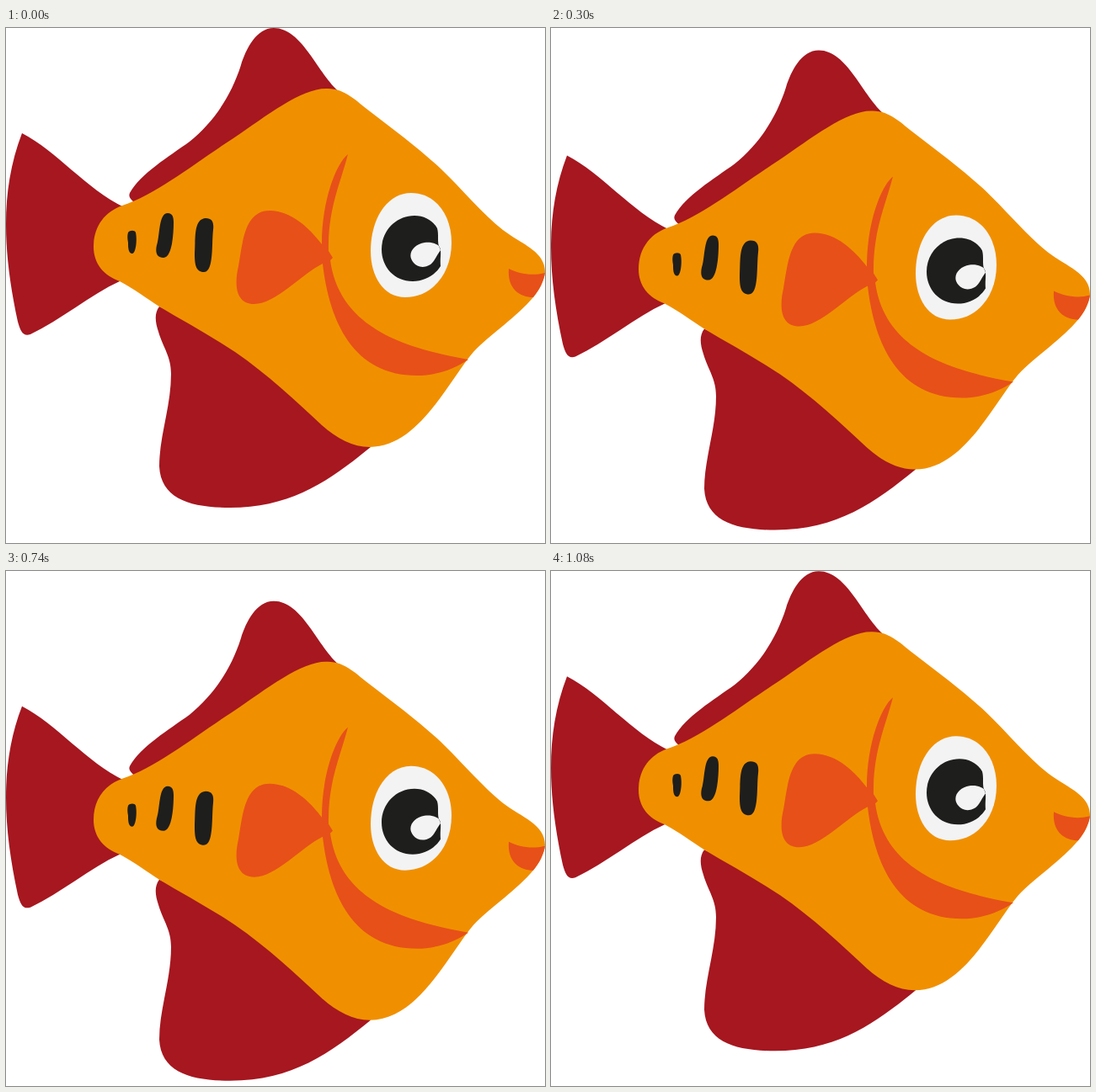
These frames come from a looping animation (640x612 px, 1.11 s). An HTML page:

```html
<!DOCTYPE html>
<html lang="en">
<head>
<meta charset="utf-8">
<title>Bobbing fish</title>
<style>
  html, body { margin: 0; width: 100%; height: 100%; overflow: hidden; background: #fff; }
  svg { display: block; width: 640px; height: 612px; }
  .fin { fill: #a61720; }
  .body { fill: #f09000; }
  .accent { fill: #e75019; }
  .white { fill: #f3f3f4; }
  .black { fill: #1e1e1c; }
</style>
</head>
<body>
<svg viewBox="0 0 640 612">
  <g id="fish">
    <g class="fin">
      <!-- tail, top fin, bottom fin -->
      <path d="M19 125C60 146 95 191 140 213L150 260L135 301C100 317 65 347 29 364C20 367 17 360 14 349C-3 270 -8 195 19 125Z"/>
      <path d="M397 77C370 55 352 0 318 0C297 0 285 25 279 44C267 82 246 112 218 135C193 153 160 173 147 196C145 201 148 203 152 207L300 150Z"/>
      <path d="M182 331C176 339 177 349 181 361C187 381 196 390 196 411C196 450 182 485 182 521C184 560 220 570 266 570C340 570 385 537 433 498L330 400Z"/>
    </g>
    <path class="body" d="M380 72C402 71 416 87 432 99C462 122 490 143 516 167C541 191 566 221 590 240C612 257 640 265 640 290C639 300 633 312 626 320C608 342 575 364 555 385C525 420 490 498 432 498C412 498 393 488 375 472C345 444 310 411 272 385C242 365 212 349 182 331C168 322 152 310 135 301C116 294 104 280 104 260C104 237 116 219 138 211C180 197 225 160 270 131C310 104 350 72 380 72Z"/>
    <g class="accent">
      <!-- gill and side fin, then mouth -->
      <path d="M406 150C392 161 375 205 375 257C362 240 340 217 313 217C283 217 281 255 276 283C272 300 270 328 295 328C320 328 350 293 376 280C384 350 413 413 488 413C512 413 533 405 549 394C470 380 396 355 385 276L388 273L383 265C382 215 397 185 406 150Z"/>
      <path d="M597 286C609 292 624 295 640 291C639 300 633 312 626 320C610 320 595 310 597 286Z"/>
    </g>
    <path class="white" d="M481 196C510 196 529 222 529 255C529 292 506 320 474 320C448 320 433 295 433 265C433 226 453 196 481 196Z"/>
    <g class="black">
      <path d="M485 223C497 223 507 229 512 238C514 245 512 254 514 259C518 264 515 272 516 283C509 294 497 301 483 301C461 301 446 284 446 263C446 241 463 223 485 223Z"/>
      <path d="M145 243C147 240 153 240 154 243C156 252 154 268 150 268C145 268 145 260 145 255C144 250 144 246 145 243Z"/>
      <path d="M192 220C198 220 199 225 199 231C199 246 197 273 187 273C179 273 177 267 179 258C183 247 181 220 192 220Z"/>
      <path d="M237 226C245 226 247 231 246 240C244 256 247 290 235 290C225 290 224 280 224 268C225 248 223 227 237 226Z"/>
    </g>
    <path class="white" d="M497 255C504 254 511 256 514 259L516 264C512 269 509 277 504 281C496 286 488 284 484 279C475 269 484 257 497 255Z"/>
  </g>
</svg>
<script>
  const LOOP = 1110, STEPS = 33, DROP = 41.7;
  const fish = document.getElementById('fish');

  const bezier = (s, a, b) => 3 * s * (1 - s) ** 2 * a + 3 * s * s * (1 - s) * b + s ** 3;

  // Cubic ease in and out: find the curve parameter by bisection.
  function ease(x) {
    let lo = 0, hi = 1;
    for (let i = 0; i < 24; i++) {
      const mid = (lo + hi) / 2;
      if (bezier(mid, 0.645, 0.355) < x) lo = mid; else hi = mid;
    }
    return bezier(lo, 0.045, 1);
  }

  const start = performance.now();

  function draw(now) {
    const t = Math.max(0, now - start) % LOOP;
    const step = Math.min(STEPS - 1, Math.floor((t + 4) / LOOP * STEPS));
    const phase = step / STEPS * 2;
    const y = DROP * ease(phase < 1 ? phase : 2 - phase);
    fish.setAttribute('transform', `translate(0 ${y.toFixed(2)})`);
    requestAnimationFrame(draw);
  }
  draw(start);
</script>
</body>
</html>
```
